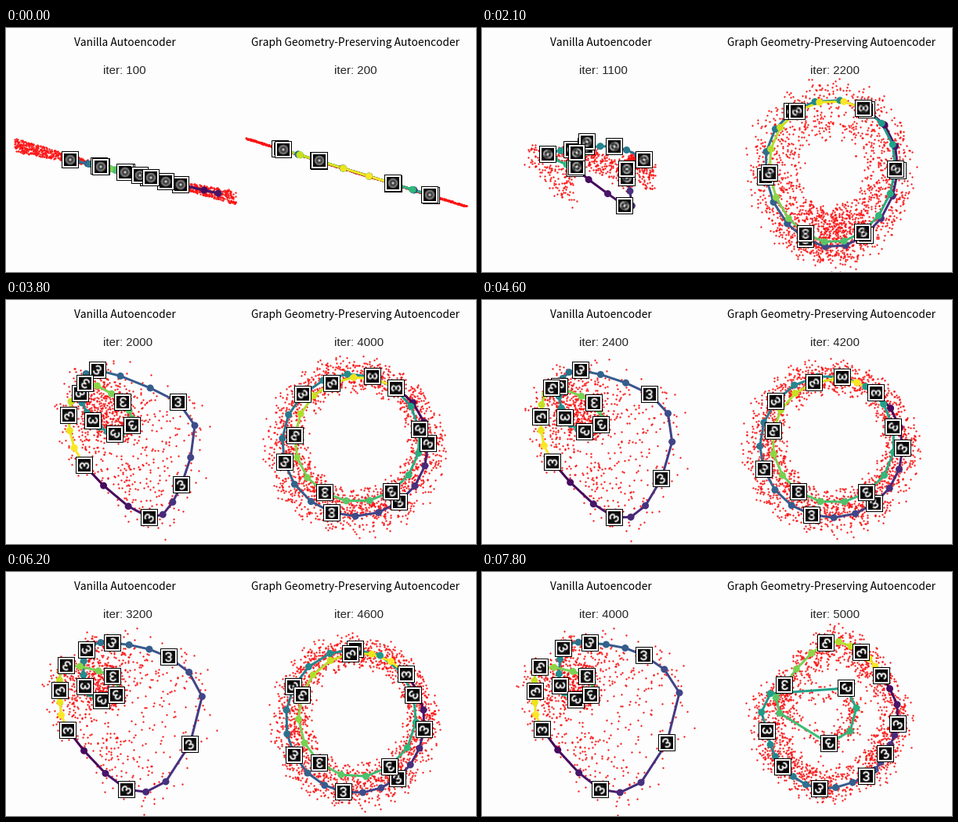
A matplotlib script that plays this animation: 600 px wide and 313 px high, repeating every 8 s.

```python
import numpy as np
import matplotlib.pyplot as plt
from matplotlib.animation import FuncAnimation
from matplotlib.collections import LineCollection
from matplotlib.patches import Rectangle

W, H, DPI = 600, 313, 100
PX = 72 / DPI
N = 36  # nodes on each path, every third one carries a thumbnail
IDX = np.arange(N)
TAIL = [*range(1300, 2701, 200), 2800, 3100, *range(3200, 7801, 200)]


# --- paths ----------------------------------------------------------------
def loop(keys):
    """Smooth closed path through a few key nodes (cubic Hermite)."""
    k = np.array(sorted(keys))
    p = np.array([keys[i] for i in k], float)
    t = np.r_[k[-2:] - N, k, k[:2] + N]
    p = np.r_[p[-2:], p, p[:2]]
    m = np.zeros_like(p)
    m[1:-1] = (p[2:] - p[:-2]) / (t[2:] - t[:-2])[:, None]
    j = np.searchsorted(t, IDX, "right") - 1
    h = (t[j + 1] - t[j])[:, None]
    s = (IDX - t[j])[:, None] / h
    return ((1 + 2 * s) * (1 - s) ** 2 * p[j] + s * (1 - s) ** 2 * h * m[j]
            + s * s * (3 - 2 * s) * p[j + 1] + s * s * (s - 1) * h * m[j + 1])


def line(xs, y0, slope):
    return loop({k: (x, y0 + slope * x) for k, x in xs.items()})


def ring(cx, cy, rx, ry, split=0, swing=0, egg=0, skew=0):
    """Two turns round an ellipse, the first one wider than the second."""
    turn = 2 * np.pi * IDX / N
    a = 2 * turn - np.radians(60 + 5 * (swing > 0))
    a = a - np.radians(swing) * np.sin(turn - np.pi / 3)
    r = 1 + split * np.sin(turn)
    x = rx * r * np.cos(a) * (1 - egg * np.sin(a))
    return np.column_stack([cx + x, cy + ry * r * np.sin(a) + skew * x])


# --- scatter --------------------------------------------------------------
def noise(seed, n):
    rng = np.random.default_rng(seed)
    return rng.random(n), rng.random(n), rng.normal(size=(n, 2))


def band(rnd, cx, cy, half, slope, thick, power=1, cone=0):
    """Points along a straight strip, optionally pinched in the middle."""
    u, v, _ = rnd
    t = np.sign(u - 0.5) * np.abs(2 * u - 1) ** power
    dy = thick * (2 * v - 1) * np.abs(t) ** cone
    return np.column_stack([cx + half * t, cy + slope * half * t + dy])


def halo(rnd, nodes, lo, hi, gamma=1, jitter=4, thin=0):
    """Points around a path, scaled between lo and hi about its centre."""
    u, v, g = rnd
    i = u * N + thin * N / (4 * np.pi) * np.sin(4 * np.pi * (u - 16.5 / N))
    edge = np.column_stack([np.interp(i, IDX, c, period=N) for c in nodes.T])
    c = nodes.mean(axis=0)
    return c + (edge - c) * (lo + (hi - lo) * v ** gamma)[:, None] + jitter * g


def blend(poses, step, settle):
    """Pose at a step; the last span eases out with the given power."""
    keys = list(poses)
    j = min(np.searchsorted(keys, step, "right"), len(keys) - 1)
    a, b = keys[j - 1], keys[j]
    t = (step - a) / (b - a)
    if b == keys[-1]:
        t = 1 - (1 - t) ** settle
    return poses[a] * (1 - t) + poses[b] * t


# --- thumbnails -----------------------------------------------------------
def digit(deg):
    """A 16 px picture of a 3, turned counterclockwise."""
    a = np.radians(np.linspace(-155, 90, 30))
    x = np.r_[np.cos(a), np.cos(a[::-1])] * 0.4 - 0.08
    y = np.r_[np.sin(a) - 1, 1 - np.sin(a[::-1])] * 0.33
    c, s = np.cos(np.radians(deg)), np.sin(np.radians(deg))
    px, py = x * c + y * s, y * c - x * s
    gx, gy = np.meshgrid(*[(np.arange(16) - 7.5) / 8] * 2)
    d = np.hypot(gx[..., None] - px, gy[..., None] - py).min(-1)
    return np.exp(-(d / 0.15) ** 2)


DIGITS = [digit(30 * (3 - i)) for i in range(12)]
DISC = 0.9 * np.mean([digit(a) for a in range(0, 360, 10)], axis=0)


def thumb(i, disc, twin):
    pic = (1 - twin / 2) * DIGITS[i] + twin / 2 * DIGITS[(i + 6) % 12]
    img = np.zeros((22, 22))
    img[1:-1, 1:-1] = 1
    img[3:-3, 3:-3] = 0.03 + 0.95 * (disc * DISC + (1 - disc) * pic)
    return img


# --- poses by training step -----------------------------------------------
left = {
    1: line({0: 223, 2: 271, 3: 204, 6: 152, 9: 119, 12: 82, 15: 122, 18: 154,
             21: 182, 24: 152, 27: 121, 30: 171, 33: 185}, 150.3, 0.228),
    8: line({0: 122, 3: 166, 6: 184, 9: 191, 12: 246, 15: 202, 18: 125, 21: 58,
             24: 83, 27: 118, 30: 142, 33: 135}, 147.8, 0.245),
    15: loop({0: (115, 182), 3: (203, 280), 4: (214, 278), 6: (187, 190),
              9: (176, 162), 12: (154, 117), 15: (124, 92), 18: (102, 125),
              21: (119, 163), 24: (172, 190), 27: (152, 119), 30: (123, 97),
              33: (102, 131)}),
    20: loop({0: (100, 212), 3: (183, 279), 6: (224, 237), 8: (241, 161),
              9: (220, 131), 12: (117, 90), 15: (95, 120), 18: (111, 155),
              21: (139, 172), 24: (161, 161), 27: (149, 131), 30: (101, 107),
              33: (80, 148)}),
    40: loop({0: (77, 202), 3: (151, 279), 5: (203, 270), 6: (236, 219),
              7: (252, 155), 9: (207, 107), 12: (138, 91), 15: (104, 98),
              18: (100, 146), 21: (120, 164), 24: (139, 158), 27: (134, 134),
              30: (74, 122), 33: (68, 153)}),
}
rnd = noise(3, 1050)
left_dots = {
    1: band(rnd, 152, 184, 141, 0.24, 9, power=0.6, cone=1),
    8: band(rnd, 152, 185, 141, 0.22, 17),
    15: halo(rnd, left[15], 0.1, 1.1, 0.7, 8),
    20: halo(rnd, left[20], 0.35, 1.15, 0.8, 8),
    40: halo(rnd, left[40], 0.35, 1.15, 0.8, 8),
}

right = {
    1: ring(447, 185, 95, 0, split=0.02, skew=0.31),
    8: ring(447, 188, 76, 95, split=0.015, egg=0.2),
    15: ring(447, 182, 91, 90, split=0.06, swing=4),
    20: ring(447, 182, 87, 86, split=0.11, swing=13),
    32: ring(447, 186, 83, 87, split=0.12, swing=30),
    40: loop({0: (510, 133), 2: (530, 170), 3: (531, 195), 6: (515, 233),
              9: (491, 262), 12: (431, 278), 15: (384, 250), 18: (364, 204),
              20: (368, 156), 21: (465, 149), 23: (470, 204), 24: (443, 220),
              25: (380, 181), 27: (386, 145), 30: (439, 91), 33: (484, 103)}),
}
rnd = noise(8, 1900)
right_dots = {
    1: band(rnd, 447, 185, 141, 0.31, 0.7, power=1.4),
    8: halo(rnd, right[8], 0.35, 1.2, 0.75, 5, thin=0.7),
    15: halo(rnd, right[15], 0.75, 1.35, 1, 5, thin=0.5),
    20: halo(rnd, right[20], 0.84, 1.24, 1, 4, thin=0.2),
    32: halo(rnd, right[32], 0.84, 1.2, 1, 4),
    40: halo(rnd, right[40], 0.75, 1.15, 1, 6),
}


class Panel:
    def __init__(self, ax, x, span, title, title_x, times, paths, dots,
                 settle, disc, twin, count):
        self.times, self.paths, self.clouds = times, paths, dots
        self.settle, self.disc, self.twin = settle, disc, twin
        self.count = count
        colors = plt.cm.viridis(np.linspace(0, 1, N))
        ax.text(title_x, 23, title, size=13.8 * PX, color="black", ha="center",
                family="Noto Sans CJK JP")
        self.label = ax.text(x, 59, "", size=15 * PX, color="#262626",
                             family="Liberation Sans")
        self.dots = ax.scatter(*dots[1].T, s=(2.3 * PX) ** 2, c="#fb1414",
                               linewidths=0, zorder=2)
        self.dots.set_clip_path(Rectangle((span[0], 60), span[1] - span[0], H,
                                          transform=ax.transData))
        self.lines = LineCollection([], colors=colors, linewidths=3 * PX,
                                    capstyle="round", zorder=3)
        ax.add_collection(self.lines)
        self.nodes = ax.scatter(*paths[1].T, s=(9 * PX) ** 2, c=colors,
                                linewidths=0, zorder=4)
        self.thumbs = [ax.imshow(np.zeros((22, 22)), cmap="gray", vmin=0,
                                 vmax=1, interpolation="nearest",
                                 aspect="auto", zorder=5 + i / 20)
                       for i in range(12)]

    def draw(self, ms):
        step = int(np.searchsorted(self.times, ms, "right"))
        self.label.set_text(f"iter: {self.count(step)}")
        self.dots.set_offsets(blend(self.clouds, step, self.settle))
        p = blend(self.paths, step, self.settle)
        self.lines.set_segments(np.stack([p, np.roll(p, -1, axis=0)], axis=1))
        self.nodes.set_offsets(p)
        disc = np.interp(step, *self.disc)
        twin = np.interp(step, *self.twin)
        for i, im in enumerate(self.thumbs):
            x, y = np.round(p[3 * i])
            im.set_data(thumb(i, disc, twin))
            im.set_extent((x - 11, x + 11, y + 11, y - 11))


fig = plt.figure(figsize=(W / DPI, H / DPI), dpi=DPI, facecolor="#fdfdfd")
ax = fig.add_axes([0, 0, 1, 1])
ax.axis("off")
ax.set_autoscale_on(False)

panels = [
    Panel(ax, 124.2, (10, 294), "Vanilla Autoencoder", 151.5,
          [0, *range(300, 1101, 200), *TAIL], left, left_dots, 2.5,
          ([8, 15], [1, 0.1]), ([8, 20], [1, 0]), lambda s: 100 * s),
    Panel(ax, 419.2, (305, 590), "Graph Geometry-Preserving Autoencoder", 446,
          [0, *range(200, 1001, 200), *TAIL], right, right_dots, 1,
          ([1, 8, 15], [1, 0.3, 0]), ([8, 40], [1, 0]),
          lambda s: min(200 * s, 3000 + 50 * s)),
]
ax.set_xlim(0, W)
ax.set_ylim(H, 0)


def update(frame):
    for panel in panels:
        panel.draw(frame * 100)
    return []


anim = FuncAnimation(fig, update, frames=80, interval=100, repeat=True,
                     repeat_delay=0, init_func=lambda: update(0))
plt.show()
```
